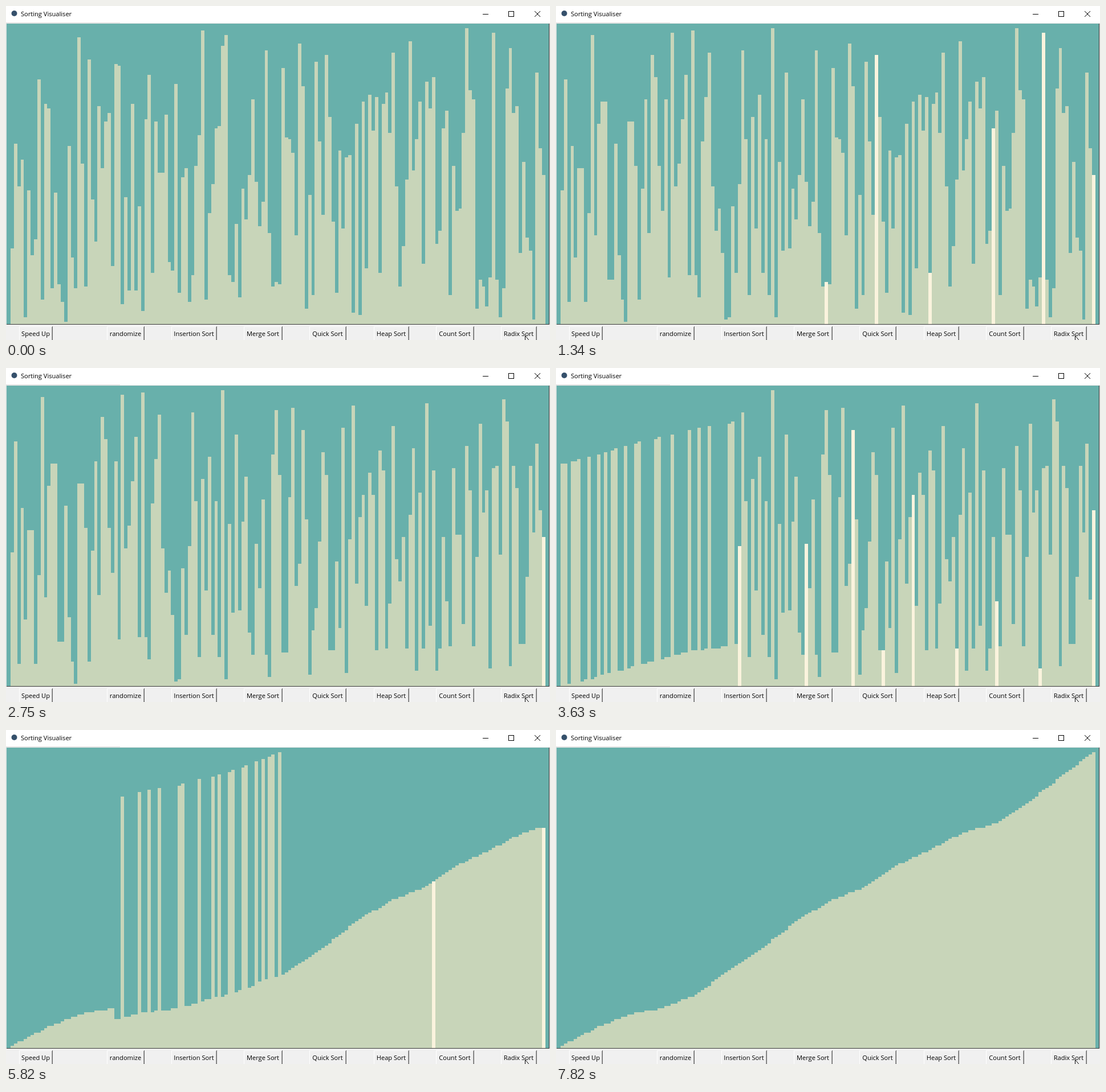
Recreate the animation shown at these times as an HTML page with a canvas. Size 954 by 587 pixels, loop 8100 ms.

```html
<!DOCTYPE html>
<html lang="en">
<head>
<meta charset="utf-8">
<title>Sorting Visualiser</title>
<style>
  html, body { margin: 0; width: 100%; height: 100%; overflow: hidden; background: #f0f0f0; }
  svg, canvas { position: absolute; left: 0; top: 0; display: block; }
  canvas { left: 1px; top: 31px; }
  text { font: 11.1px "Open Sans", "Noto Sans", sans-serif; fill: #000; }
  .light { fill: #fff; }
  .shade { fill: #a0a0a0; }
  .dark { fill: #696969; }
  .down .light { fill: #696969; }
  .down .dark { fill: #fff; }
  .down .shade { fill: #e3e3e3; }
  .down text { transform: translate(1px, 1px); }
</style>
</head>
<body>
<svg width="954" height="587" viewBox="0 0 954 587">
  <rect width="954" height="30" fill="#fff"/>
  <rect y="29" width="200" height="1" fill="#dcdcdc"/>
  <circle cx="14.5" cy="13" r="5" fill="#35506b"/>
  <text x="26" y="18">Sorting Visualiser</text>
  <g fill="none" stroke="#000">
    <path d="M836 14.5h10"/>
    <rect x="881.5" y="9.5" width="9" height="9"/>
    <path d="M927 9l10 10M937 9l-10 10"/>
  </g>
  <rect y="30" width="954" height="530" fill="#e6e6e6"/>
  <rect x="1" y="559" width="952" height="1" fill="#3c3c3c"/>
  <rect x="952" y="31" width="1" height="529" fill="#3c3c3c"/>
  <g id="buttons"></g>
  <path d="M910.5 579.5v15l3.5-3.5h6z" fill="#fff" stroke="#000"/>
</svg>
<canvas id="plot" width="951" height="528"></canvas>
<script>
const LOOP = 8100, PRESS = 130, START = 280, END = 7820;
const COUNT = 160, REDRAWS = 162;
const WRITES_PER_REDRAW = 2.985, WRITES_PER_PASS = COUNT + 2;

// The sorted outline, one point every ten bars.
const outline = [1, 9, 15, 18, 24, 35, 45, 57, 66, 72, 82, 89, 97, 101, 111, 123, 134];
function sortedHeight(rank) {
  const i = Math.floor(rank / 10);
  return outline[i] + (outline[i + 1] - outline[i]) * (rank / 10 - i);
}

// Every fourth bar of the unsorted row; the others are scattered between.
const keyBars = [
  27, 4, 117, 13, 2, 131, 58, 94, 121, 100, 97, 68, 22, 70, 86, 66, 131, 10, 108, 129,
  16, 74, 5, 83, 42, 72, 4, 89, 111, 14, 68, 116, 38, 71, 133, 17, 132, 115, 26, 2
];
const scatter = i => sortedHeight((i * i * 0.618034) % 1 * COUNT);
const data = [];
Array.from({ length: COUNT }, (_, i) => ({ i, h: i % 4 ? scatter(i) : keyBars[i / 4] }))
  .sort((a, b) => a.h - b.h)
  .forEach((bar, rank) => { data[bar.i] = Math.round(sortedHeight(rank)); });

// One stable pass per decimal digit; ends marks the last slot of each bucket.
let row = data;
const passes = [1, 10, 100].map(unit => {
  const digit = v => Math.floor(v / unit) % 10;
  const from = row;
  const to = [...from].sort((a, b) => digit(a) - digit(b));
  const ends = to.map((v, i) => i === COUNT - 1 || digit(v) !== digit(to[i + 1]));
  row = to;
  return { from, to, ends };
});

const labels = [
  ['Speed Up', 23, 82], ['randomize', 177, 243], ['Insertion Sort', 290, 370],
  ['Merge Sort', 417, 485], ['Quick Sort', 532, 597], ['Heap Sort', 645, 707],
  ['Count Sort', 754, 821], ['Radix Sort', 868, 931]
];
const buttons = document.getElementById('buttons');
buttons.innerHTML = '<rect y="560" width="954" height="27" fill="#f0f0f0"/>' +
  labels.map(([label, l, r]) => `<g>
    <rect class="light" x="${l}" y="563" width="${r - l - 1}" height="1"/>
    <rect class="light" x="${l}" y="563" width="1" height="24"/>
    <rect class="shade" x="${r - 2}" y="564" width="1" height="23"/>
    <rect class="dark" x="${r - 1}" y="563" width="1" height="24"/>
    <text x="${(l + r) / 2 - 0.5}" y="580" text-anchor="middle">${label}</text>
  </g>`).join('');
const radix = buttons.lastElementChild;

const ctx = document.getElementById('plot').getContext('2d');
ctx.translate(-1, -31);
const edge = i => Math.round(8 + 5.8625 * i);
const barTop = v => Math.floor(559.5 - v * 520 / 133);

function drawBars(heightAt, isMarked) {
  ctx.fillStyle = '#68b0ab';
  ctx.fillRect(1, 31, 951, 528);
  for (let i = 0; i < COUNT; i++) {
    const y = barTop(heightAt(i));
    ctx.fillStyle = isMarked(i) ? '#faf3dd' : '#c8d5b9';
    ctx.fillRect(edge(i), y, edge(i + 1) - edge(i), 559 - y);
  }
}

function render(t) {
  radix.classList.toggle('down', t >= PRESS && t < START);
  if (t < START) return drawBars(i => data[i], () => false);
  const progress = Math.min(1, (t - START) / (END - START));
  const redraw = Math.floor(progress * REDRAWS + 0.25);
  const writes = Math.round(redraw * WRITES_PER_REDRAW);
  const pass = passes[Math.floor(writes / WRITES_PER_PASS)];
  const done = writes % WRITES_PER_PASS;
  drawBars(i => (i < done ? pass.to : pass.from)[i], i => i >= done && pass.ends[i]);
}

function tick() {
  render(performance.now() % LOOP);
  requestAnimationFrame(tick);
}
tick();
</script>
</body>
</html>
```
